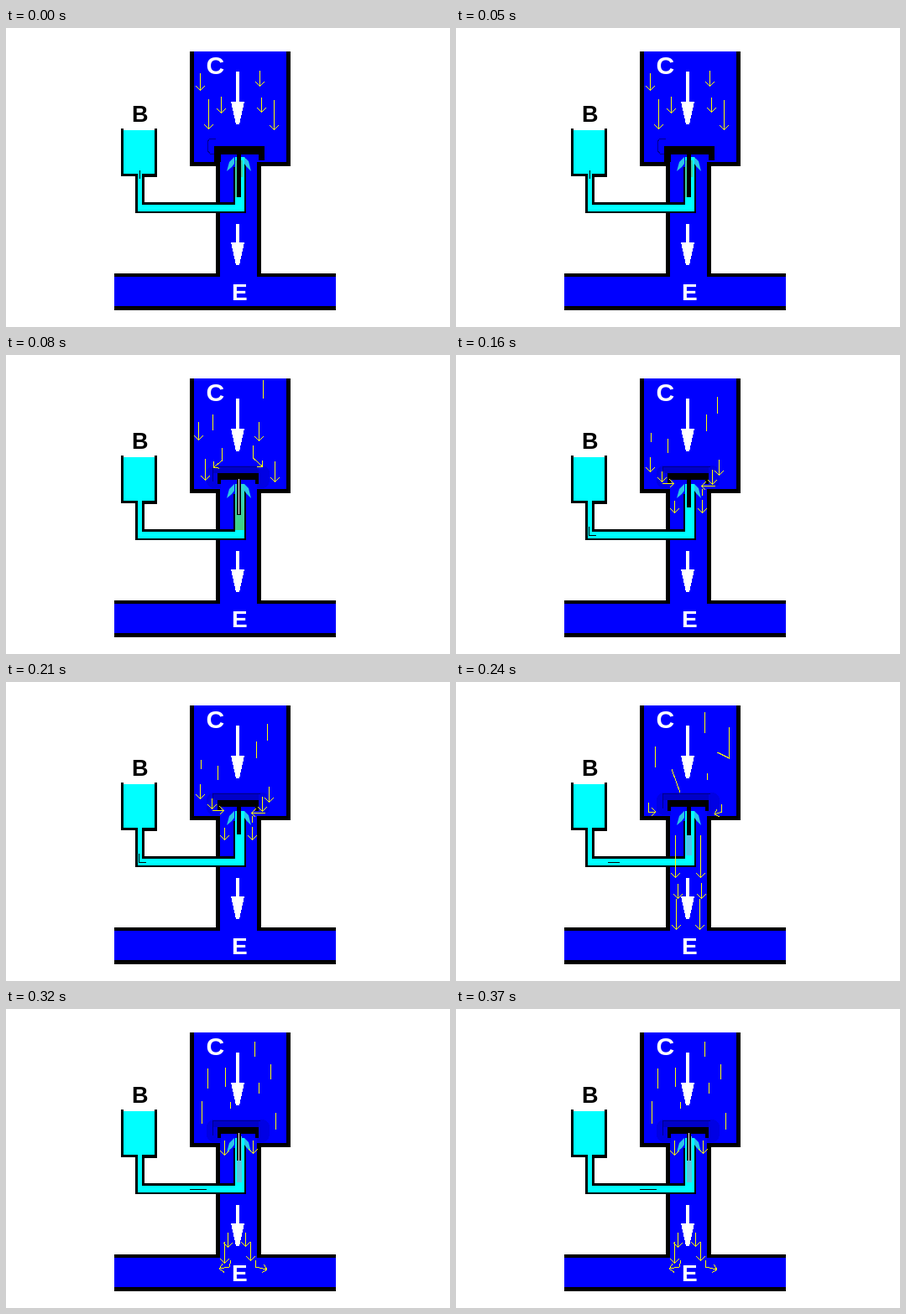
Animation of 529x357 px, one loop 400 ms. Source, as an HTML page:

```html
<!DOCTYPE html>
<html lang="en">
<head>
<meta charset="utf-8">
<title>Valve flow</title>
<style>
html, body { margin: 0; width: 100%; height: 100%; overflow: hidden; background: #fff; }
svg { display: block; width: 529px; height: 357px; shape-rendering: crispEdges; }
text { font-family: Arial, "Liberation Sans", sans-serif; font-weight: bold; }
.step { visibility: hidden; animation: show 400ms step-end infinite; }
.s1 { animation-delay: -320ms; }
.s2 { animation-delay: -240ms; }
.s3 { animation-delay: -160ms; }
.s4 { animation-delay: -80ms; }
@keyframes show { 0% { visibility: visible; } 20%, 100% { visibility: hidden; } }
.flow, .line, .bubble, .rim { fill: none; stroke: #ff0; }
.flow { marker-end: url(#head); }
.bubble { stroke: #000; }
.rim { stroke: #00008c; }
</style>
</head>
<body>
<svg viewBox="0 0 529 357">
  <defs>
    <marker id="head" markerUnits="userSpaceOnUse" markerWidth="12" markerHeight="12" refX="5.5" refY="6" orient="auto" overflow="visible">
      <path class="line" d="M1 1L6 6L1 11"/>
    </marker>
    <linearGradient id="mix" x1="0" y1="0" x2="0" y2="1">
      <stop offset="0" stop-color="#2cd8d8"/><stop offset=".6" stop-color="#3cd09c"/><stop offset="1" stop-color="#40d080"/>
    </linearGradient>
    <g id="cap">
      <rect x="239" y="132" width="75" height="27" rx="9" fill="#0000e4"/>
      <path fill="#00f" d="M256 148h43v12h-43z"/>
      <path fill="#0000c8" d="M247 134h54v7h-54z"/>
      <path class="rim" d="M246 133.500h57M246.500 134v17"/>
      <path d="M252 141h49v13h-4v-5h-41v5h-4z"/>
    </g>
    <g id="spray" fill="#29c5e8" shape-rendering="auto">
      <path d="M272 154l-6 6-3 11 6-5 3-4zM284 154l5 5 3 12-6-6-2-3z"/>
    </g>
  </defs>

  <!-- tank, pipe and main -->
  <path d="M219 28h120v137h-35v128h89v44H129v-44h121V165h-31z"/>
  <path fill="#00f" d="M224 28h110v132h-35v137h94v35H129v-35h126V160h-31z"/>

  <!-- side beaker and feed tube -->
  <path d="M137 120h43v58h-15v30h106v-42h2v-11h13v66H154v-44h-17z"/>
  <path fill="#fff" d="M140 119h37v3h-37z"/>
  <path fill="#0ff" d="M140 122h37v52h-15v37h111v-57h11v65H157v-45h-17z"/>

  <g fill="#fff">
    <path d="M274 52h4v36h6l-6 27h-4l-6-27h6z"/>
    <path d="M274 234h4v22h6l-6 27h-4l-6-27h6z"/>
    <text x="238.5" y="55" font-size="30">C</text>
    <text x="269" y="324.500" font-size="28">E</text>
  </g>
  <text x="150" y="112" font-size="27">B</text>

  <g class="step s0">
    <use href="#spray"/>
    <path fill="#3cd0a4" d="M273 158h2v44h-2zM280 158h2v20h-2z"/>
    <path d="M248 141h60v17h-7v-7h-21v51h-5v-51h-19v9h-8z"/>
    <path class="rim" d="M250 132h-7l-3 4v10l3 4h5"/>
    <path class="bubble" d="M159.500 170v10"/>
    <path class="flow" d="M231.500 54v20"/>
    <path class="flow" d="M241.500 85v35"/>
    <path class="flow" d="M319.500 86v35"/>
    <path class="flow" d="M302.500 51v18"/>
    <path class="flow" d="M256.500 82v19"/>
    <path class="flow" d="M304.500 83v17"/>
  </g>

  <g class="step s1">
    <use href="#cap"/>
    <use href="#spray"/>
    <path fill="url(#mix)" d="M273 154h11v55h-11z"/>
    <path d="M275 148h5v43h-5z"/>
    <path fill="#fff" d="M277 148h1v42h-1z"/>
    <path class="line" d="M306.500 30v22M246.500 71v19"/>
    <path class="flow" d="M229.500 80v21"/>
    <path class="flow" d="M301.500 80v22"/>
    <path class="flow" d="M257.500 111v15l-10 8"/>
    <path class="flow" d="M294.500 108v15l11 10"/>
    <path class="flow" d="M237.500 124v25"/>
    <path class="flow" d="M320.500 127v24"/>
  </g>

  <g class="step s2">
    <use href="#cap"/>
    <use href="#spray"/>
    <path fill="#0ff" d="M273 154h11v6h-11z"/>
    <path d="M275 148h5v34h-5z"/>
    <path class="bubble" d="M158.500 205v10h8"/>
    <path class="line" d="M311.500 50v20M298.500 71v20M232.500 93v11M252.500 100v17M293.500 160v8"/>
    <path class="flow" d="M231.500 122v17"/>
    <path class="flow" d="M313.500 125v18"/>
    <path class="flow" d="M245.500 139v12"/>
    <path class="flow" d="M305.500 137v17"/>
    <path class="flow" d="M246 153.500h13"/>
    <path class="flow" d="M309 156.500h-16"/>
    <path class="flow" d="M260.500 174v14"/>
    <path class="flow" d="M293.500 173v15"/>
  </g>

  <g class="step s3">
    <use href="#cap"/>
    <use href="#spray"/>
    <path fill="#0ff" d="M273 154h11v6h-11z"/>
    <path fill="#4cc4ec" d="M274 183h7v24h-7z"/>
    <path d="M275 148h5v35h-5z"/>
    <path class="bubble" d="M181 215.500h14"/>
    <path class="line" d="M296.500 36v25M257 104l10 28M325.500 54v37l-14-7M237.500 77v25M299.500 109v8"/>
    <path class="flow" d="M229.500 144v11h8"/>
    <path class="flow" d="M316.500 146v9l-8 3"/>
    <path class="flow" d="M261.500 183v50"/>
    <path class="flow" d="M291.500 183v50"/>
    <path class="flow" d="M264.500 241v17"/>
    <path class="flow" d="M292.500 240v18"/>
    <path class="flow" d="M262.500 259v36"/>
    <path class="flow" d="M290.500 259v36"/>
  </g>

  <g class="step s4">
    <use href="#cap"/>
    <use href="#spray"/>
    <path fill="#0ff" d="M273 154h11v6h-11z"/>
    <path fill="#5cc4dc" d="M275 152h6v55h-6z"/>
    <path d="M275 148h5v33h-5z"/>
    <path fill="#fff" d="M277 148h1v33h-1z"/>
    <path class="bubble" d="M219 215.500h20"/>
    <path class="line" d="M296.500 39v18M240.500 71v24M261.500 70v23M315.500 66v18M301.500 88v13M233.500 110v27M267.500 111v8M321.500 124v20"/>
    <path class="flow" d="M260.500 157v17"/>
    <path class="flow" d="M294.500 157v15"/>
    <path class="flow" d="M264.500 267v17"/>
    <path class="flow" d="M285.500 267v16"/>
    <path class="flow" d="M260.500 278v25"/>
    <path class="flow" d="M291.500 278v22"/>
    <path class="flow" d="M267.500 300l-1 8-12 2"/>
    <path class="flow" d="M297.500 300v8l13 3"/>
  </g>
</svg>
</body>
</html>
```
